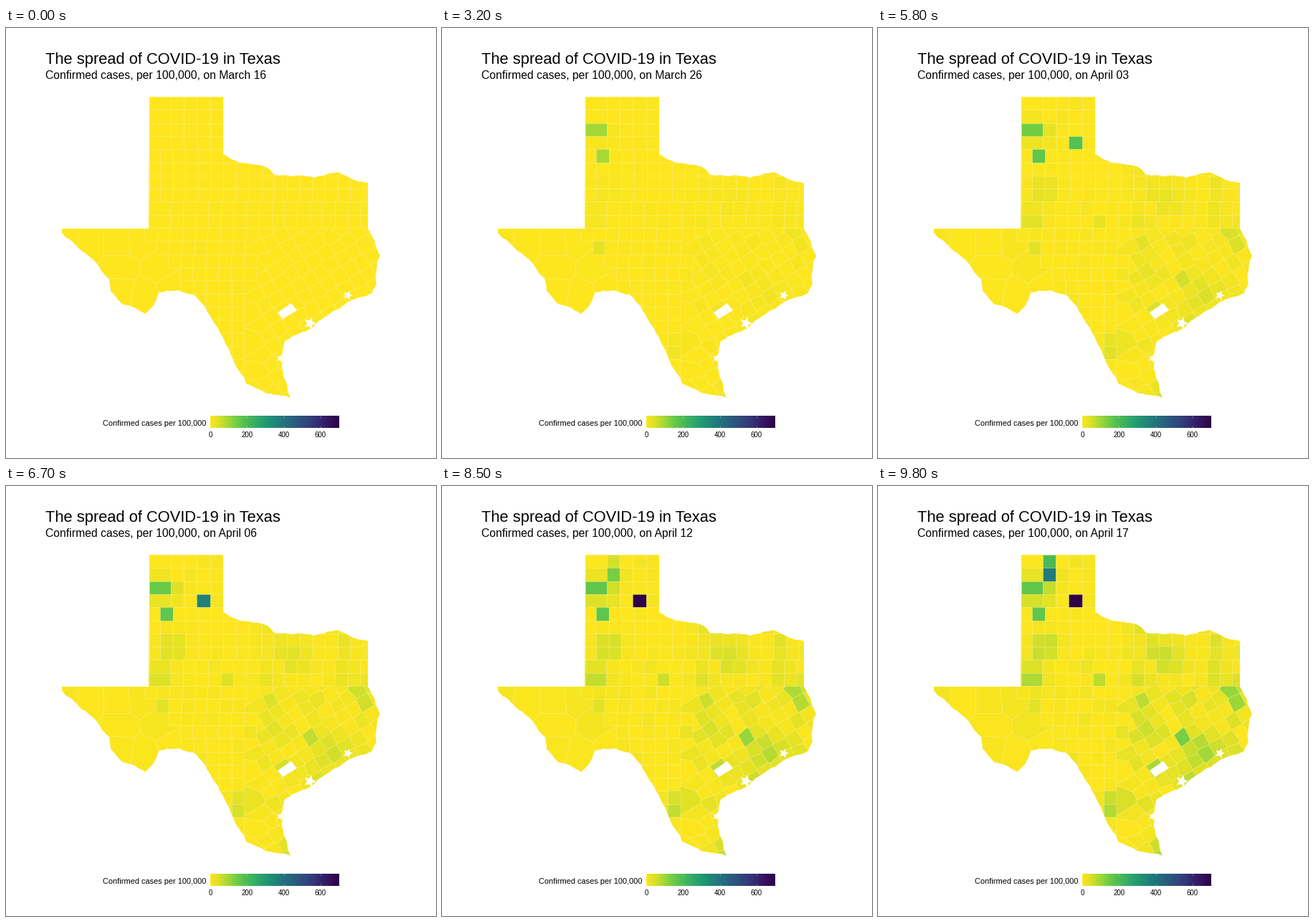
Animation, 600 px wide and 600 px high, one loop 10 s. Source, as a matplotlib script:

```python
import numpy as np
import matplotlib.pyplot as plt
from matplotlib.animation import FuncAnimation
from matplotlib.collections import PolyCollection
from matplotlib.colors import LinearSegmentedColormap
from matplotlib.patches import PathPatch
from matplotlib.path import Path

SIZE, DPI, FRAMES, INTERVAL = 600, 72, 100, 100
LAST_DAY, MAX_RATE = 32, 700
rng = np.random.default_rng(16)

CMAP = LinearSegmentedColormap.from_list("cases", [
    (0, "#fde61e"), (.07, "#d8e028"), (.14, "#a0d838"), (.21, "#6ccc46"),
    (.29, "#48ba58"), (.4, "#26a070"), (.5, "#1f8679"), (.6, "#256b7e"),
    (.7, "#2e527e"), (.8, "#343878"), (.9, "#351b66"), (1, "#2f0046")], N=1024)

# Key points of the state border, clockwise
RED_RIVER = [(303, 176), (318, 184), (337, 189), (363, 194), (373, 204), (400, 207),
             (430, 209), (463, 201), (482, 210), (505, 216)]
COAST = [(505, 280), (513, 294), (522, 318), (517, 336), (517, 357), (511, 370),
         (482, 380), (466, 391), (432, 413), (398, 431), (389, 437), (385, 457),
         (387, 485), (397, 516)]
RIO_GRANDE = [(397, 516), (361, 509), (336, 497), (320, 470), (298, 425), (277, 388),
              (261, 372), (240, 366), (213, 369), (207, 384), (194, 399), (162, 385),
              (146, 367), (144, 351), (128, 330), (98, 303), (86, 294), (78, 286)]
HOLE = [(379, 397), (398, 384), (406, 394), (386, 406)]
BAYS = [(477, 373, 7), (424, 412, 9), (383, 461, 6)]

# Centres of the large counties beyond the regular rows
DESERT = [(88, 300), (113, 300), (160, 300), (185, 298), (160, 335),
          (158, 365), (195, 372), (214, 335), (230, 362)]

# Hotspots: x, y, final rate, radius
HOTSPOTS = [
    (455, 372, 95, 30), (405, 243, 85, 17), (500, 290, 200, 17), (380, 345, 75, 18),
    (233, 224, 110, 18), (225, 145, 105, 20), (437, 402, 145, 12), (424, 350, 140, 9),
    (325, 447, 105, 16), (380, 303, 80, 12), (88, 295, 50, 15), (357, 378, 45, 16),
    (472, 262, 55, 18), (217, 266, 110, 16), (306, 268, 80, 9), (390, 505, 75, 15)]

# Sudden local outbreaks: x, y, final rate, first day, last day, power
OUTBREAKS = [
    (215, 142, 165, 3, 24, .5), (226, 178, 165, 5, 18, .6), (276, 160, 700, 15.5, 27, 1),
    (239, 124, 380, 25, 32, 1), (239, 105, 200, 26, 32, 1), (217, 301, 35, 5, 7, 1)]


def roughen(points, rounds=3):
    """Add displaced midpoints, smaller with every round."""
    for _ in range(rounds):
        result = [points[0]]
        for a, b in zip(points, points[1:]):
            spread = .07 * np.hypot(b[0] - a[0], b[1] - a[1])
            middle = np.add(a, b) / 2 + rng.uniform(-spread, spread, 2)
            result += [tuple(middle), b]
        points = result
    return points


def star(x, y, radius):
    angles = np.arange(10) * np.pi / 5
    radii = radius * np.where(np.arange(10) % 2, .45, 1)
    return list(zip(x + radii * np.cos(angles), y + radii * np.sin(angles)))


def cut(polygon, middle, normal):
    """Keep the part of a polygon behind the line through middle."""
    kept = []
    for a, b in zip(polygon, polygon[1:] + polygon[:1]):
        da = np.dot(np.subtract(a, middle), normal)
        db = np.dot(np.subtract(b, middle), normal)
        if da <= 0:
            kept.append(a)
        if da * db < 0:
            t = da / (da - db)
            kept.append((a[0] + t * (b[0] - a[0]), a[1] + t * (b[1] - a[1])))
    return kept


def box(left, top, right, bottom):
    return [(left, top), (right, top), (right, bottom), (left, bottom)]


def nearest_cells(sites, reach=90):
    cells = []
    for x, y in sites:
        cell = box(x - 45, y - 45, x + 45, y + 45)
        for u, v in sites:
            if 0 < np.hypot(u - x, v - y) < reach:
                cell = cut(cell, ((x + u) / 2, (y + v) / 2), (u - x, v - y))
        cells.append(cell)
    return cells


def tilted_sites(pitch=18.3, angle=np.radians(-32)):
    """A jittered lattice for the irregular counties of the south-east."""
    sites = []
    for i in range(-14, 15):
        for j in range(-14, 15):
            dx, dy = pitch * np.array((i, j)) + rng.uniform(-2.8, 2.8, 2)
            x = 424 + dx * np.cos(angle) - dy * np.sin(angle)
            y = 350 + dx * np.sin(angle) + dy * np.cos(angle)
            if 343 < x < 526 and 266 < y < 520:
                sites.append((x, y))
    return sites


def row_cells(height=18.3, width=17.7):
    """Rectangular counties in rows from the panhandle southwards."""
    cells = []
    for row in range(23):
        top = 96 + height * row
        if row < 4:
            edges = [200, *np.linspace(229.5, 303, 5)]
        elif row < 10:
            first = 229 if row > 7 else 215
            edges = [200, *np.arange(first, 304 if row == 4 else 515, width)]
        else:
            edges = np.arange(min(193 + 16.5 * (row - 10), 244), 350, width)
        cells += [box(a, top, b, top + height) for a, b in zip(edges, edges[1:])]
    return cells


def final_rates(centres):
    x, y = centres.T
    rates = rng.exponential(np.where(x > 335, 17, 5))
    for hx, hy, peak, radius in HOTSPOTS:
        near = np.exp(-((x - hx) ** 2 + (y - hy) ** 2) / radius ** 2)
        rates = np.maximum(rates, peak * near * rng.uniform(.8, 1.1, len(x)))
    return rates


def closed(points):
    return Path(list(points) + [points[0]], closed=True)


shapes = nearest_cells(DESERT + tilted_sites()) + row_cells()
centres = np.array([np.mean(shape, axis=0) for shape in shapes])
final = final_rates(centres)
first_day = np.full(len(shapes), 4.)
last_day = np.full(len(shapes), float(LAST_DAY))
power = rng.uniform(1.1, 1.5, len(shapes))
for x, y, *outbreak in OUTBREAKS:
    k = np.argmin(np.hypot(*(centres - (x, y)).T))
    final[k], first_day[k], last_day[k], power[k] = outbreak


def rates_on(day):
    progress = np.clip((day - first_day) / (last_day - first_day), 0, 1)
    return final * progress ** power


border = ([(200, 96), (303, 96)] + roughen(RED_RIVER) + roughen(COAST)
          + roughen(RIO_GRANDE) + [(78, 280), (199, 280)])
stage = [(-5, -5), (-5, 605), (605, 605), (605, -5)]

fig = plt.figure(figsize=(SIZE / DPI, SIZE / DPI), dpi=DPI, facecolor="white")
ax = fig.add_axes([0, 0, 1, 1])
ax.axis("off")

ax.add_patch(PathPatch(closed(border), fc=CMAP(0.), ec="none", zorder=1))
counties = PolyCollection(shapes, edgecolors=(1, 1, 1, .33), linewidths=.6, zorder=2)
ax.add_collection(counties, autolim=False)
outside = Path.make_compound_path(closed(stage), closed(border))
ax.add_patch(PathPatch(outside, fc="white", ec="none", zorder=3))
for gap in [HOLE] + [star(*bay) for bay in BAYS]:
    ax.add_patch(PathPatch(closed(gap), fc="white", ec="none", zorder=3))


def label(x, y, text, size, **style):
    return ax.text(x, y, text, fontsize=size, family="Liberation Sans",
                   color="black", va="baseline", zorder=5, **style)


label(55, 50, "The spread of COVID-19 in Texas", 21.9)
subtitle = label(55, 71, "", 15.8)
label(135, 555, "Confirmed cases per 100,000", 11)

BAR_LEFT, BAR_RIGHT, BAR_TOP, BAR_BOTTOM = 285, 464.7, 541, 558
ax.imshow(np.linspace(0, 1, 360)[None, :], cmap=CMAP, aspect="auto", zorder=4,
          extent=(BAR_LEFT, BAR_RIGHT, BAR_BOTTOM, BAR_TOP))
for value in range(0, MAX_RATE, 200):
    x = BAR_LEFT + (BAR_RIGHT - BAR_LEFT) * value / MAX_RATE
    for y0, y1 in ((BAR_TOP, BAR_TOP + 3.4), (BAR_BOTTOM - 3.4, BAR_BOTTOM)):
        ax.plot([x, x], [y0, y1], color="white", lw=.5, alpha=.5, zorder=5)
    label(x, 571, str(value), 9.6, ha="center")
ax.set_xlim(0, SIZE)
ax.set_ylim(SIZE, 0)

STARTS = [0, 3, 7] + [2 + 3 * day for day in range(3, LAST_DAY + 1)]


def day_at(frame):
    """Each day is held, with one halfway frame before the next."""
    day = max(d for d, start in enumerate(STARTS) if start <= frame)
    halfway = day < LAST_DAY and frame == STARTS[day + 1] - 1
    return day, .5 * halfway


def date_text(day):
    return f"March {16 + day}" if day < 16 else f"April {day - 15:02d}"


def update(frame):
    day, part = day_at(frame)
    counties.set_facecolor(CMAP(rates_on(day + part) / MAX_RATE))
    subtitle.set_text(f"Confirmed cases, per 100,000, on {date_text(day)}")
    return counties, subtitle


animation = FuncAnimation(fig, update, frames=FRAMES, interval=INTERVAL,
                          init_func=lambda: update(0), repeat=True, repeat_delay=0)
plt.show()
```
